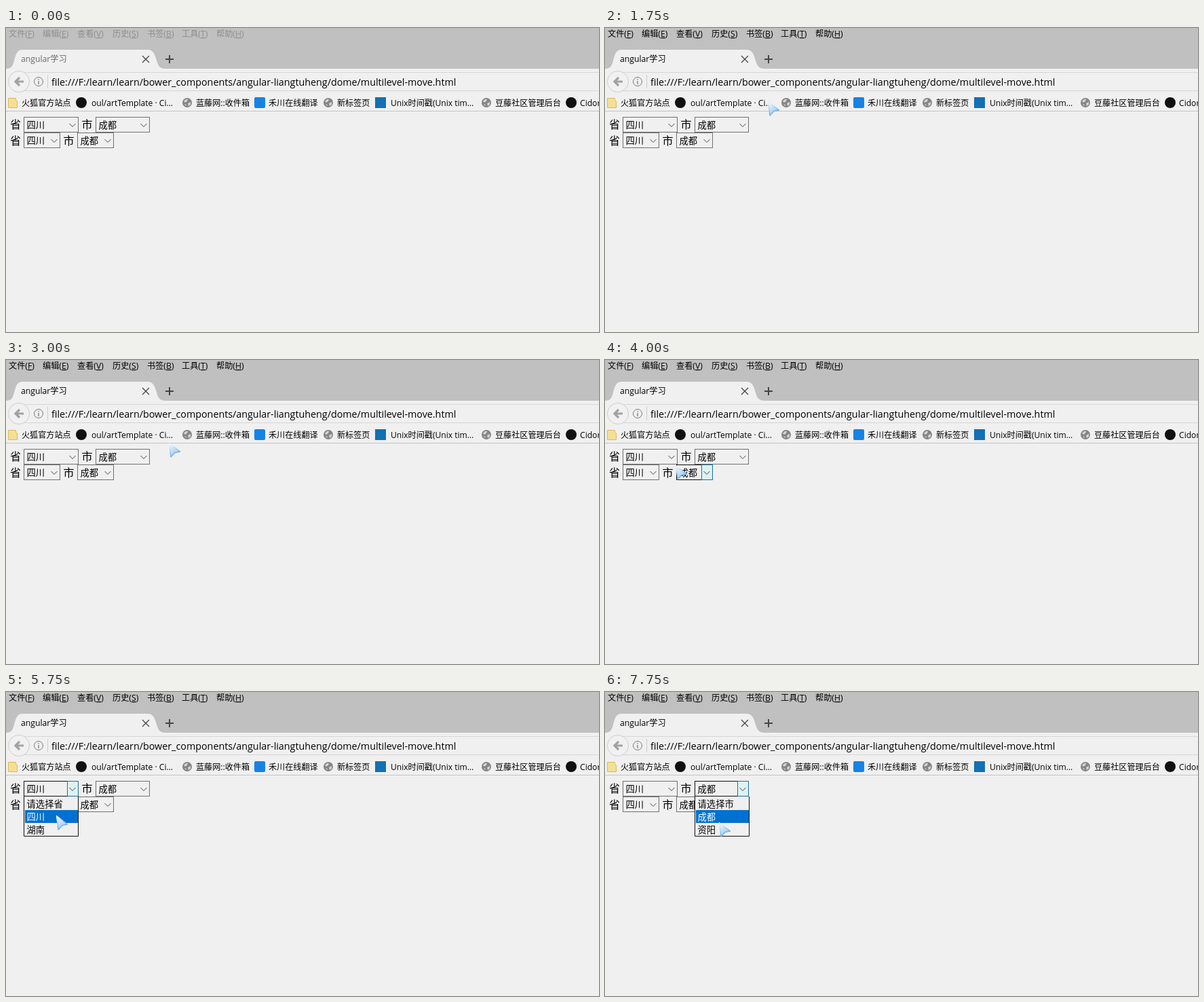
These frames come from a looping animation (874 px wide and 448 px high, 8 s). An HTML page:

```html
<!DOCTYPE html>
<html lang="zh-CN">
<head>
<meta charset="utf-8">
<title>angular学习</title>
<style>
html, body { margin: 0; width: 100%; height: 100%; overflow: hidden; background: #f0f0f0; }
svg { display: block; width: 874px; height: 448px; }
text { font-family: "Open Sans", "Noto Sans CJK SC", "Noto Sans CJK", sans-serif; fill: #000; white-space: pre; }
.menu text, .tab { font-size: 12.2px; }
.menu tspan { text-decoration: underline; }
.url { font-size: 14.3px; }
.marks text { font-size: 12.1px; }
.label { font-size: 16px; }
.value { font-size: 13.33px; }
.line { fill: none; stroke: #444; }
.box { fill: #f0f0f0; stroke: #707070; }
.hot .frame { fill: none; stroke: #111; }
.hot .btn { fill: #def2f2; stroke: #1a6f9c; }
.list .panel { fill: #f0f0f0; }
.list .edge { fill: none; stroke: #111; }
.list .pick { fill: #0071d1; }

/* all states switch in hard 250 ms steps */
.wake, .tab, .hot, .list, .focus, #cursor { animation: 8s step-end infinite; }
.hot, .list, .focus, #cursor { visibility: hidden; }
.wake { --idle: #8e8e8e; animation-name: wake; }
.tab { --idle: #6c6c6c; animation-name: wake; }
.focus { animation-name: focus; }
#hotA { animation-name: hotA; }
#hotB { animation-name: hotB; }
#hotD { animation-name: hotD; }
#listA { animation-name: listA; }
#listB { animation-name: listB; }
#cursor { animation-name: move; }

@keyframes wake {
  0% { fill: var(--idle); }
  18.75%, 100% { fill: #000; }
}
@keyframes focus {
  0%, 37.5%, 100% { visibility: hidden; }
  28.125% { visibility: visible; }
}
@keyframes hotA {
  0%, 18.75%, 84.375%, 100% { visibility: hidden; }
  12.5%, 56.25% { visibility: visible; }
}
@keyframes hotB {
  0%, 100% { visibility: hidden; }
  90.625% { visibility: visible; }
}
@keyframes hotD {
  0%, 53.125%, 100% { visibility: hidden; }
  40.625% { visibility: visible; }
}
@keyframes listA {
  0%, 84.375%, 100% { visibility: hidden; }
  59.375% { visibility: visible; }
}
@keyframes listB {
  0%, 100% { visibility: hidden; }
  93.75% { visibility: visible; }
}
@keyframes move {
  0% { visibility: hidden; transform: translate(170px, 240px); }
  3.125% { visibility: visible; transform: translate(170px, 240px); }
  6.25% { visibility: visible; transform: translate(146px, 204px); }
  9.375% { visibility: visible; transform: translate(122px, 168px); }
  12.5% { visibility: visible; transform: translate(101px, 142px); }
  15.625% { visibility: visible; transform: translate(104px, 140px); }
  18.75% { visibility: visible; transform: translate(150px, 130px); }
  21.875% { visibility: visible; transform: translate(240px, 108px); }
  25% { visibility: visible; transform: translate(330px, 88px); }
  28.125% { visibility: visible; transform: translate(366px, 80px); }
  31.25% { visibility: visible; transform: translate(371px, 79px); }
  37.5% { visibility: visible; transform: translate(240px, 122px); }
  40.625% { visibility: visible; transform: translate(122px, 155px); }
  50% { visibility: visible; transform: translate(104px, 155px); }
  53.125% { visibility: visible; transform: translate(98px, 155px); }
  56.25% { visibility: visible; transform: translate(92px, 148px); }
  59.375%, 62.5% { visibility: visible; transform: translate(87px, 148px); }
  65.625% { visibility: visible; transform: translate(80px, 176px); }
  68.75% { visibility: visible; transform: translate(76px, 184px); }
  71.875% { visibility: visible; transform: translate(74px, 182px); }
  84.375% { visibility: visible; transform: translate(121px, 160px); }
  87.5% { visibility: visible; transform: translate(160px, 152px); }
  90.625% { visibility: visible; transform: translate(196px, 143px); }
  93.75% { visibility: visible; transform: translate(190px, 160px); }
  96.875%, 100% { visibility: visible; transform: translate(168px, 192px); }
}
</style>
</head>
<body>
<svg viewBox="0 0 874 448">
  <defs>
    <linearGradient id="ice" x1="0" y1="0" x2=".6" y2="1">
      <stop offset="0" stop-color="#f4f9fd"/>
      <stop offset="1" stop-color="#9cc6ea"/>
    </linearGradient>
    <linearGradient id="rim" x1="0" y1="0" x2=".3" y2="1">
      <stop offset=".2" stop-color="#e3eff9"/>
      <stop offset=".8" stop-color="#6fb0e6"/>
    </linearGradient>
    <g id="globe">
      <circle r="7" fill="#858585"/>
      <path d="M-5-2Q-2-6 1-5L0-2-3 0zM1 1L5-1 5 3 2 5zM-4 2L-1 3-2 5z" fill="#d4d4d4"/>
    </g>
    <path id="chevron" d="M-4.5-2L0 2.5 4.5-2" class="line"/>
  </defs>

  <rect width="874" height="448" fill="#f0f0f0"/>
  <rect width="874" height="60" fill="#c0c0c0"/>
  <path d="M0 60C8 60 10 56 12 48C15 38 16 32 25 32H208C217 32 219 38 222 48C224 56 227 60 235 60Z" fill="#f0f0f0"/>

  <g class="menu" id="menu"></g>
  <text class="tab" x="22" y="50">angular学习</text>
  <path d="M201 41L211 51M211 41L201 51" class="line" stroke-width="1.3"/>
  <path d="M235 46H247M241 40V52" class="line" stroke="#333" stroke-width="2"/>

  <path d="M27 65.5H874M27 92.5H874" class="line" style="stroke:#d5d5d5"/>
  <path class="focus" d="M27 66H874M27 92H874" fill="none" stroke="#0b649c" stroke-width="2"/>
  <circle cx="19" cy="79" r="15.5" fill="#f1f1f1" stroke="#cdcdcd"/>
  <path d="M26 79H14M20 73L14 79 20 85" fill="none" stroke="#a2a2a2" stroke-width="3.2"/>
  <circle cx="48" cy="79" r="6.5" class="line" style="stroke:#7a7a7a"/>
  <path d="M48 78V83M48 75V76.5" class="line" style="stroke:#7a7a7a" stroke-width="1.3"/>
  <path d="M61.5 69V89" class="line" style="stroke:#ccc"/>
  <text class="url" x="67" y="84.5">file:///F:/learn/learn/bower_components/angular-liangtuheng/dome/multilevel-move.html</text>

  <g class="marks" id="marks">
    <path d="M3.5 103.5H14.5V106L16.5 108V117.5H3.5Z" fill="#f5df95" stroke="#d9b95c"/>
    <circle cx="111" cy="110" r="8" fill="#111"/>
    <use href="#globe" x="267" y="110"/>
    <rect x="366" y="102" width="16" height="16" rx="2" fill="#1583e6"/>
    <use href="#globe" x="475" y="110"/>
    <rect x="544" y="102" width="16" height="16" fill="#1270b4"/>
    <use href="#globe" x="708" y="110"/>
    <circle cx="833" cy="110" r="8" fill="#111"/>
  </g>
  <path d="M0 122.5H874" class="line" style="stroke:#c4c4c4"/>

  <g id="page"></g>
  <g id="lists"></g>

  <path id="cursor" d="M.5 .5L16.5 13 9 14.5 3 21Z" fill="url(#ice)" stroke="url(#rim)" stroke-width="1.3" stroke-linejoin="round"/>
</svg>
<script>
const put = (id, markup) => document.getElementById(id).insertAdjacentHTML("beforeend", markup);
const text = (x, y, str, cls = "") => `<text x="${x}" y="${y}" class="${cls}">${str}</text>`;
const rect = (x, y, w, h, cls) => `<rect x="${x + .5}" y="${y + .5}" width="${w}" height="${h}" class="${cls}"/>`;

[[4, "文件", "F"], [54, "编辑", "E"], [105, "查看", "V"], [157, "历史", "S"],
 [208, "书签", "B"], [259, "工具", "T"], [310, "帮助", "H"]]
  .forEach(([x, name, key]) => put("menu", text(x, 13, `${name}(<tspan>${key}</tspan>)`, "wake")));

[[23, "火狐官方站点"], [126, "oul/artTemplate · Ci…"], [280, "蓝藤网::收件箱"], [387, "禾川在线翻译"],
 [488, "新标签页"], [567, "Unix时间戳(Unix tim…"], [721, "豆藤社区管理后台"], [846, "Cidorb"]]
  .forEach(([x, name]) => put("marks", text(x, 115, name)));

function select(x, y, w, value, hotId) {
  const arrow = `<use href="#chevron" x="${x + w - 8}" y="${y + 12}"/>`;
  const hot = hotId ? `<g class="hot" id="${hotId}">${rect(x, y, w, 22, "frame")}${rect(x + w - 16, y, 16, 22, "btn")}${arrow}</g>` : "";
  put("page", rect(x, y, w, 22, "box") + text(x + 4.5, y + 16.5, value, "value") + arrow + hot);
}

function list(id, x, options) {
  const rows = options.map((str, i) =>
    `<text x="${x + 4.5}" y="${170 + 19 * i}" class="value"${i === 1 ? ' style="fill:#fff"' : ""}>${str}</text>`);
  put("lists", `<g class="list" id="${id}"><rect x="${x}" y="154" width="81" height="59" class="panel"/>` +
    `<path d="M${x + .5} 154V212.5H${x + 80.5}V154" class="edge"/>` +
    `<rect x="${x + 2}" y="174" width="78" height="19" class="pick"/>${rows.join("")}</g>`);
}

put("page", text(6, 148, "省", "label") + text(111.5, 148, "市", "label") +
  text(6, 171.5, "省", "label") + text(84.5, 171.5, "市", "label"));
select(26, 131, 80, "四川", "hotA");
select(132, 131, 79, "成都", "hotB");
select(26, 154, 53, "四川");
select(105, 154, 53, "成都", "hotD");
list("listA", 26, ["请选择省", "四川", "湖南"]);
list("listB", 132, ["请选择市", "成都", "资阳"]);
</script>
</body>
</html>
```
